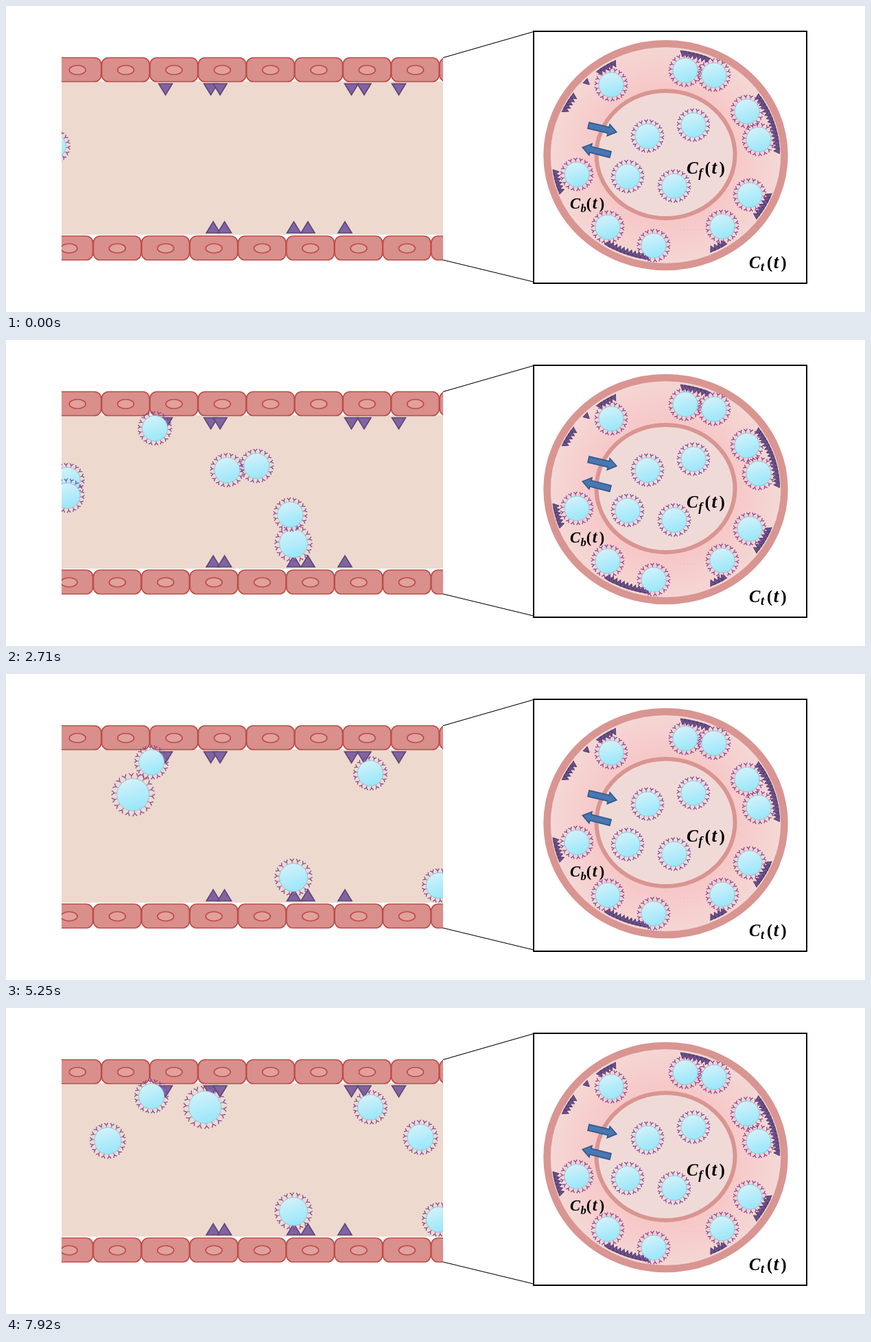
An HTML page with a canvas for the animation above (8 s loop, 1252 px wide and 447 px high).

```html
<!DOCTYPE html>
<html lang="en">
<head>
<meta charset="utf-8">
<title>Particles in a vessel</title>
<style>
  html, body { margin: 0; width: 100%; height: 100%; overflow: hidden; background: #fff; }
  canvas { display: block; }
</style>
</head>
<body>
<canvas id="stage" width="1252" height="447"></canvas>
<script>
const LOOP = 8000;
const ENTRY = 55;
const TAU = Math.PI * 2;
const canvas = document.getElementById('stage');
const ctx = canvas.getContext('2d');

// Straight flights from the left edge: start time, speed, height, slope, resting x, radius.
const flights = [
  { start: -45, speed: 0.286, y: 204, slope: 0.056, r: 19 },
  { start: 40, speed: 0.279, y: 271, slope: 0.072, end: 419, r: 20.5 },
  { start: 2225, speed: 0.55, y: 185, slope: 0.019 },
  { start: 2652, speed: 0.585, y: 205, slope: -0.013 },
  { start: 2653, speed: 0.595, y: 225, slope: 0.068 },
  { start: 2765, speed: 0.4, y: 222, slope: 0.03 },
  { start: 2850, speed: 0.4, y: 200, slope: 0.02 },
  { start: 3212, speed: 0.55, y: 285, slope: -0.03 },
  { start: 3326, speed: 0.516, y: 278, slope: -0.08, r: 21.5 },
  { start: 4600, speed: 0.2, y: 215, slope: -0.298, end: 290, r: 23.5 },
  { start: 5922, speed: 0.2747, y: 255.6, slope: -0.1213, r: 19 },
  { start: 7562, speed: 0.26, y: 202, slope: -0.086, r: 19.5 }
];

// Bent routes to the wall: waypoints of [time, x, y].
const captures = [
  [[1170, ENTRY, 205], [2710, 365, 184], [3310, 531, 145]],
  [[1170, ENTRY, 266], [2710, 414, 255], [3310, 631, 309]],
  [[1500, ENTRY, 195], [2710, 217, 129], [2900, 212, 129]]
];

const crossSectionParticles = [
  [990, 94], [1032, 101], [882, 115], [1080, 154], [1097, 195], [1002, 174], [935, 190],
  [832, 246], [906, 249], [974, 263], [1084, 276], [1044, 322], [877, 323], [944, 350]
];

// Receptor clusters on the outer ring, as angle ranges in degrees.
const receptorArcs = [
  [23, 36], [59, 67], [100, 123], [160, 171], [206, 216], [225, 225], [234, 244], [279, 292], [326, 358]
];

function paint(fill, stroke, width) {
  if (fill) { ctx.fillStyle = fill; ctx.fill(); }
  if (stroke) { ctx.strokeStyle = stroke; ctx.lineWidth = width; ctx.stroke(); }
}

function ellipse(x, y, rx, ry, fill, stroke, width) {
  ctx.beginPath();
  ctx.ellipse(x, y, rx, ry, 0, 0, TAU);
  paint(fill, stroke, width);
}

function triangle(half, height, fill, stroke, width) {
  ctx.beginPath();
  ctx.moveTo(0, -half);
  ctx.lineTo(0, half);
  ctx.lineTo(height, 0);
  ctx.closePath();
  paint(fill, stroke, width);
}

function line(x1, y1, x2, y2, color, width) {
  ctx.beginPath();
  ctx.moveTo(x1, y1);
  ctx.lineTo(x2, y2);
  paint(null, color, width);
}

function at(x, y, angle, draw) {
  ctx.save();
  ctx.translate(x, y);
  ctx.rotate(angle);
  draw();
  ctx.restore();
}

function inVessel(draw) {
  ctx.save();
  ctx.beginPath();
  ctx.rect(81, 70, 556, 306);
  ctx.clip();
  draw();
  ctx.restore();
}

function particle(x, y, r = 18.5, spikes = 18) {
  const s = r / 18.5;
  for (let i = 0; i < spikes; i++) {
    at(x, y, (i + 0.25) / spikes * TAU, () => {
      line(r, 0, r + 3.4 * s, 0, '#c9629f', 1.2);
      ctx.beginPath();
      ctx.moveTo(r + 6.3 * s, -2.6 * s);
      ctx.lineTo(r + 3.2 * s, 0);
      ctx.lineTo(r + 6.3 * s, 2.6 * s);
      paint(null, '#7d4a99', 1.3);
    });
  }
  const shade = ctx.createLinearGradient(x - r * 0.3, y - r, x + r * 0.3, y + r);
  shade.addColorStop(0, '#d4f1f9');
  shade.addColorStop(0.5, '#b5ecfa');
  shade.addColorStop(1, '#98e6fb');
  ellipse(x, y, r, r, shade, '#8ccbe0', 1);
}

function cellRow(left, top) {
  for (let i = 0; i < 9; i++) {
    const x = left + i * 70.35;
    ctx.beginPath();
    ctx.roundRect(x, top, 69.6, 35, 10);
    paint('#d98f8c', '#bf4b47', 1.7);
    ellipse(x + 35, top + 18, 12, 6.7, '#e1a19e', '#bf4b47', 1.6);
  }
}

function wallReceptor(x, base, direction) {
  at(x, base, direction * Math.PI / 2, () => triangle(10, 16.5, '#8064a2', '#5c4776', 1.6));
}

function vessel() {
  ctx.fillStyle = '#eed9cf';
  ctx.fillRect(81, 110, 556, 224);
  cellRow(69.2, 75.5);
  cellRow(57, 336);
  [232.5, 298.5, 312, 503.5, 522, 572.5].forEach(x => wallReceptor(x, 113.5, 1));
  [302, 318.5, 419.5, 440, 494].forEach(x => wallReceptor(x, 331.5, -1));
}

function arrow(x, y, angle) {
  at(x, y, angle, () => {
    ctx.beginPath();
    ctx.moveTo(0, -4.5);
    ctx.lineTo(30, -4.5);
    ctx.lineTo(30, -8.5);
    ctx.lineTo(42, 0);
    ctx.lineTo(30, 8.5);
    ctx.lineTo(30, 4.5);
    ctx.lineTo(0, 4.5);
    ctx.closePath();
    paint('#4877b2', '#30588c', 1.6);
  });
}

function formula(x, y, size, index) {
  const write = (text, dx, dy, scale, style = 'italic bold') => {
    ctx.font = `${style} ${size * scale}px "Liberation Serif", "Noto Serif", serif`;
    ctx.fillText(text, x + dx * size, y + dy * size);
  };
  ctx.fillStyle = '#000';
  write('C', 0, 0, 1);
  write(index, 0.69, 0.2, 0.74);
  write('(', 1.06, 0, 1, 'bold');
  write('t', 1.46, 0, 1.08);
  write(')', 1.9, 0, 1, 'bold');
}

function crossSection() {
  const cx = 961.5, cy = 218;
  line(637, 75.5, 769, 37.5, '#000', 1.2);
  line(637, 371, 769, 403, '#000', 1.2);
  ctx.beginPath();
  ctx.rect(769, 37, 398, 368);
  paint('#fff', '#000', 2);

  const flesh = ctx.createRadialGradient(cx, cy, 95, cx, cy, 175);
  flesh.addColorStop(0, '#f6c7c7');
  flesh.addColorStop(0.4, '#f6cecd');
  flesh.addColorStop(1, '#f3dad7');
  ellipse(cx, cy, 173, 163, flesh, '#d99591', 10.5);
  ellipse(cx, cy - 1, 101, 93, '#f0dad8', '#d99591', 6);

  for (const [from, to] of receptorArcs) {
    for (let angle = from; angle <= to; angle += 2.1) {
      const a = angle * TAU / 360;
      const dx = 166 * Math.cos(a), dy = 154 * Math.sin(a);
      at(cx + dx, cy + dy, Math.atan2(-dy, -dx), () => triangle(4.5, 8.5, '#69508a', '#4e3a6a', 0.9));
    }
  }
  ctx.setLineDash([2, 4]);
  line(981, 327, 1016, 327, '#f3b5bd', 1);
  ctx.setLineDash([]);
  crossSectionParticles.forEach(([x, y]) => particle(x, y, 18));
  arrow(849, 174.5, 0.23);
  arrow(881, 217, Math.PI + 0.25);
  formula(992, 245, 25, 'f');
  formula(822, 296, 22.5, 'b');
  formula(1083, 382.5, 24.5, 't');
}

function drawFlight({ start, speed, y, slope, end = 700, r }, time) {
  if (time < start) return;
  const x = Math.min(end, ENTRY + speed * (time - start));
  particle(x, y + slope * (x - ENTRY), r);
}

function drawCapture(stops, time) {
  if (time < stops[0][0]) return;
  const [a, b] = time < stops[1][0] ? stops : stops.slice(1);
  const k = Math.min(1, (time - a[0]) / (b[0] - a[0]));
  particle(a[1] + (b[1] - a[1]) * k, a[2] + (b[2] - a[2]) * k);
}

const backdrop = document.createElement('canvas');

function drawBackdrop() {
  ctx.fillStyle = '#fff';
  ctx.fillRect(0, 0, canvas.width, canvas.height);
  inVessel(vessel);
  crossSection();
  backdrop.width = canvas.width;
  backdrop.height = canvas.height;
  backdrop.getContext('2d').drawImage(canvas, 0, 0);
}

function frame() {
  const time = performance.now() % LOOP;
  ctx.drawImage(backdrop, 0, 0);
  inVessel(() => {
    flights.forEach(flight => drawFlight(flight, time));
    captures.forEach(stops => drawCapture(stops, time));
  });
  requestAnimationFrame(frame);
}

drawBackdrop();
frame();
</script>
</body>
</html>
```
